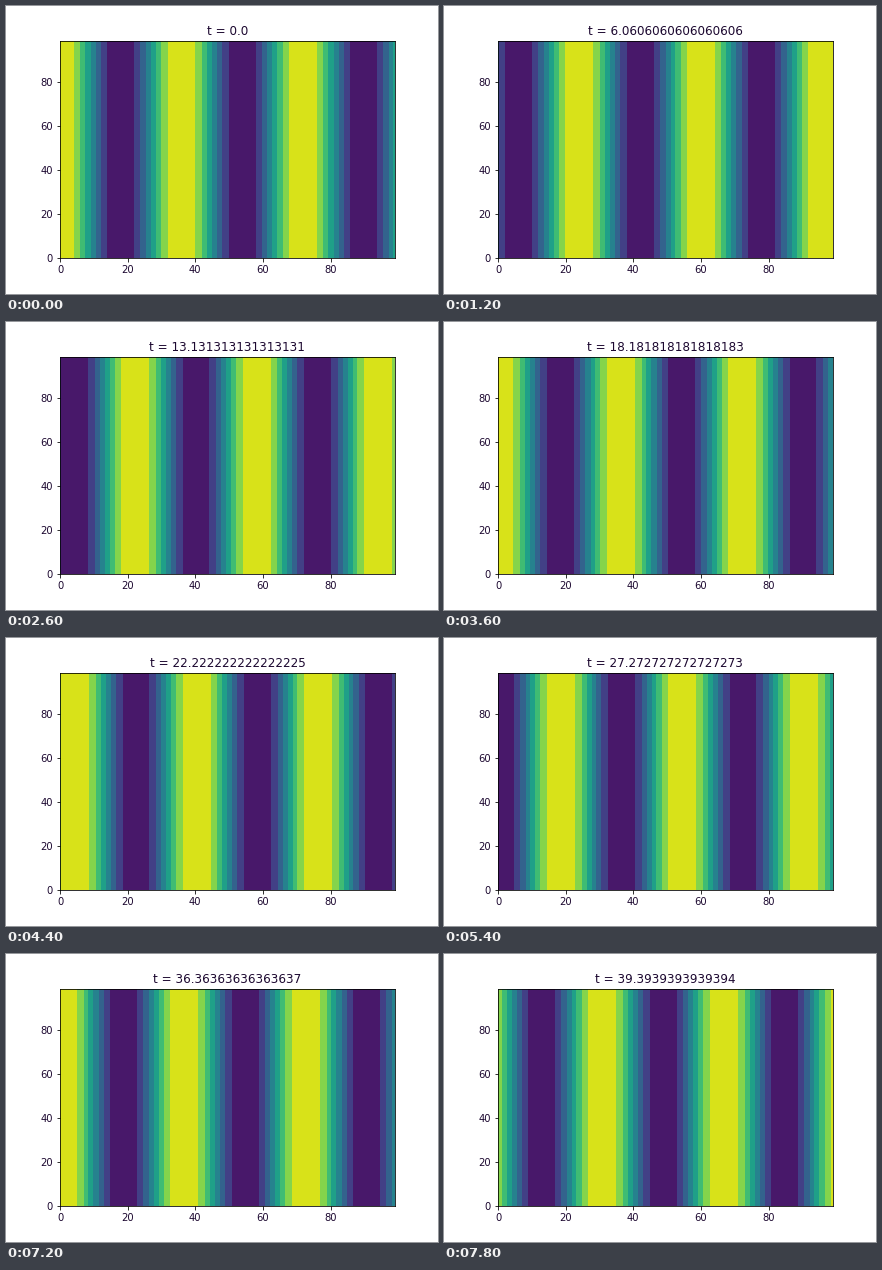
Recreate the animation shown at these times as a matplotlib script. Size 432 by 288 pixels, loop 8000 ms.

```python
import numpy as np
import matplotlib.pyplot as plt
from matplotlib.animation import FuncAnimation

plt.rcParams["font.family"] = "DejaVu Sans"

N = 100          # grid points per side
FRAMES = 40
INTERVAL = 200   # ms
K = np.sqrt(3)   # wave number; the wave travels at unit speed
INK = "#1c0830"

x = np.linspace(0, 10, N)
times = np.linspace(0, 100, N)
levels = np.linspace(-1, 1, 9)

fig, ax = plt.subplots(figsize=(6, 4), dpi=72, facecolor="white")
fig.subplots_adjust(left=0.125, right=0.9, bottom=0.125, top=0.88)


def draw(i):
    t = times[i]
    wave = np.clip(np.cos(K * (x - t)), -1, 1)
    ax.clear()
    ax.contourf(np.tile(wave, (N, 1)), levels=levels, cmap="viridis")
    ax.set_xlim(0, N - 1)
    ax.set_ylim(0, N - 1)
    ax.set_xticks(range(0, N, 20))
    ax.set_yticks(range(0, N, 20))
    ax.tick_params(labelsize=10, labelcolor=INK)
    ax.set_title(f"t = {float(t)}", fontsize=12, color=INK, pad=6)
    return []


anim = FuncAnimation(fig, draw, frames=FRAMES, init_func=lambda: draw(0),
                     interval=INTERVAL, repeat=True, repeat_delay=0)
plt.show()
```
